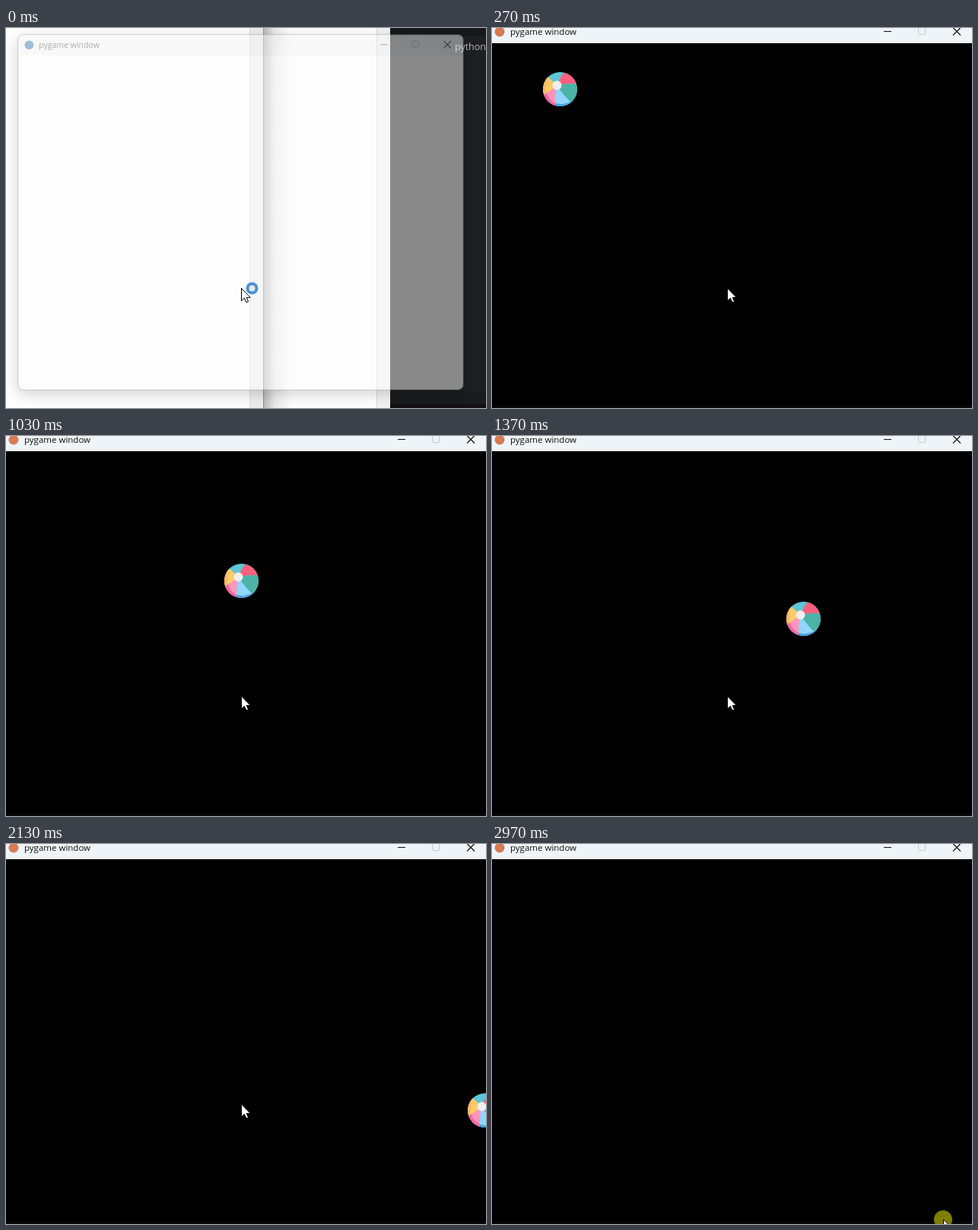
Animation, 631 px wide and 500 px high, one loop 3.02 s. Source, as an HTML page:

```html
<!DOCTYPE html>
<html lang="en">
<head>
<meta charset="utf-8">
<title>Bouncing ball window</title>
<style>
  html, body { margin: 0; width: 100%; height: 100%; overflow: hidden; background: #000; }
  svg { display: block; width: 631px; height: 500px; }
  text { font-family: "Open Sans", "Noto Sans", sans-serif; }
  #window { filter: drop-shadow(0 6px 10px rgba(0, 0, 0, .35)); }
</style>
</head>
<body>
<svg viewBox="0 0 631 500">
  <defs>
    <linearGradient id="shade">
      <stop offset="0" stop-opacity=".27"/>
      <stop offset=".4" stop-opacity=".08"/>
      <stop offset="1" stop-opacity="0"/>
    </linearGradient>
    <clipPath id="frameClip"><rect x="-6" y="-10" width="640" height="511" rx="8"/></clipPath>
    <clipPath id="ballClip"><circle cx="22.5" cy="22.5" r="22.5"/></clipPath>
  </defs>

  <g id="desktop">
    <rect width="338" height="500" fill="#fdfdfd"/>
    <rect x="320" width="18" height="500" fill="#ececec"/>
    <path d="M320.5 0V500" stroke="#dcdcdc"/>
    <rect x="338" width="167" height="500" fill="#fdfdfd"/>
    <rect x="339" width="36" height="500" fill="url(#shade)"/>
    <path d="M338.5 0V500" stroke="#8c9090"/>
    <rect x="487" width="18" height="500" fill="#f1f1f1"/>
    <path d="M487.5 0V500" stroke="#d8d8d8"/>
    <rect x="505" width="126" height="500" fill="#1e1f20"/>
    <rect x="505" width="126" height="11" fill="#17181b"/>
    <rect x="505" y="478" width="126" height="17" fill="#191b1e"/>
    <rect x="505" y="495" width="126" height="5" fill="#140f13"/>
    <text x="590" y="29" font-size="12.5" fill="#b4b4b4">python</text>
  </g>

  <g id="window">
    <g clip-path="url(#frameClip)">
      <rect id="client" x="-6" y="-10" width="640" height="511"/>
      <rect id="titleBar" x="-6" y="-10" width="640" height="30"/>
      <rect id="bottomBand" x="-6" y="496" width="640" height="5" fill="#060606"/>
    </g>
    <rect x="-6" y="-10" width="640" height="511" rx="8" fill="none" stroke="#5a5a5a" stroke-opacity=".6"/>
    <circle id="icon" cx="10" cy="5" r="6.5"/>
    <g id="caption">
      <text x="24" y="9" font-size="11.5" fill="currentColor">pygame window</text>
      <g fill="none" stroke="currentColor">
        <path d="M515 4.5H525"/>
        <path d="M606 -.5L616 9.5M616 -.5L606 9.5" stroke-width="1.2"/>
        <rect x="560.5" y="-.5" width="9" height="9" rx="1" stroke="#c4c8ca"/>
      </g>
    </g>
    <g id="ball">
      <g clip-path="url(#ballClip)">
        <rect width="45" height="45" fill="#5fc5d8"/>
        <path id="redPanel" d="M18.5 17.5Q22 7 29 -1H46V16Q34 14 18.5 17.5Z"/>
        <path d="M18.5 17.5Q34 14 46 16V46H42L37 40Q26 30 18.5 17.5Z" fill="#4bb3a7"/>
        <path d="M18.5 17.5Q26 30 38 41L34 46H16Q15 32 18.5 17.5Z" fill="#90d6ff"/>
        <path d="M16 41Q27 44 36 39L40 42L36 46H16Z" fill="#4aa3e2"/>
        <path id="pinkPanel" d="M18.5 17.5Q15 32 16 46H-1V31Q9 25 18.5 17.5Z"/>
        <path id="pinkEdge" d="M1 29L5 27Q7 37 16 41V46H-1Z"/>
        <path d="M18.5 17.5Q9 25 -1 31V7L6 6Q12 11 18.5 17.5Z" fill="#ffcb66"/>
        <path d="M6 6Q3 16 4 28L-1 31V6Z" fill="#fbb567"/>
        <circle cx="18.5" cy="17.5" r="6" fill="#f0eff0"/>
      </g>
    </g>
  </g>

  <circle id="click" cx="593" cy="494" r="12" fill="#7f7f00"/>
  <g id="cursor">
    <path d="M0 0V16.5L3.8 12.9L6.4 18.6L9.1 17.4L6.7 12.1H11.7Z" fill="#fff" stroke="#000"/>
    <circle id="busy" cx="14" cy="0" r="6" fill="#e9e9e9" stroke="#4a90d9" stroke-width="4"/>
  </g>
</svg>
<script>
const LOOP = 3020, LAST = 43;
const SHORT_STEPS = [1, 8, 16, 23, 42];
const OPENING = [0.915, 0.956, 0.987];

const el = id => document.getElementById(id);
const show = (id, on) => el(id).setAttribute('display', on ? 'inline' : 'none');
const fill = (id, color) => el(id).setAttribute('fill', color);
const move = (id, x, y, scale = 1) =>
  el(id).setAttribute('transform', `translate(${x} ${y}) scale(${scale})`);

// Steps last 70 ms, a few are 10 ms shorter or longer.
const stepStart = n =>
  70 * n - 10 * SHORT_STEPS.filter(s => s < n).length + (n > 39 ? 10 : 0);

function stepAt(time) {
  let n = LAST;
  while (n > 0 && stepStart(n) > time) n--;
  return n;
}

function smoother(u) {
  u = Math.min(1, Math.max(0, u));
  return u * u * u * (u * (6 * u - 15) + 10);
}

function draw(time) {
  const n = stepAt(time);
  const ghost = n === 0, fresh = n === 1;
  const scale = OPENING[n] ?? 1;

  move('window', 250 * (1 - scale), 209 * (1 - scale), scale);
  el('window').setAttribute('opacity', ghost ? 0.475 : 1);
  fill('client', ghost ? '#fff' : '#000');
  fill('titleBar', ghost ? '#f4f4f4' : fresh ? '#f1f2f5' : '#eef4f8');
  fill('icon', ghost ? '#3f78b0' : fresh ? '#d9b84a' : '#d87a55');
  el('caption').setAttribute('color', ghost ? '#505050' : '#111');
  show('bottomBand', n > 2);

  show('ball', !ghost);
  move('ball', 20 * n - 13, 10 * n + 18);
  fill('redPanel', fresh ? '#ff8078' : '#ff607d');
  fill('pinkPanel', fresh ? '#ffa27c' : '#ff96ba');
  fill('pinkEdge', fresh ? '#f58088' : '#fa66a2');

  const travel = smoother((n - 33) / 8);
  move('cursor', 309.5 + 284 * travel, 342.5 + 151.5 * travel);
  show('busy', ghost);
  show('click', n === LAST);
}

const origin = performance.now();
function tick() {
  draw((performance.now() - origin) % LOOP);
  requestAnimationFrame(tick);
}
tick();
</script>
</body>
</html>
```
